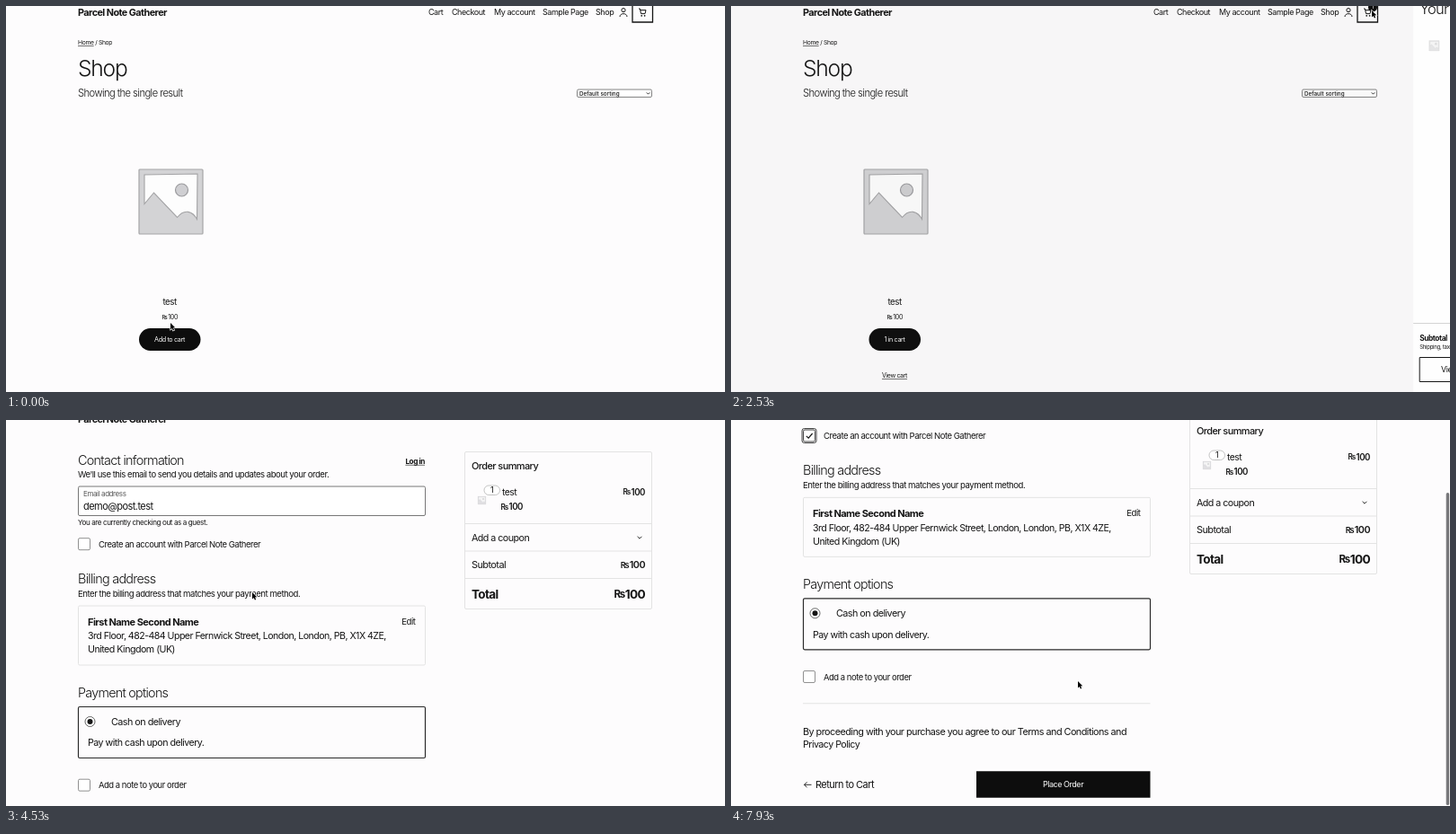
Write an HTML page with a canvas that moves like this. It is 800 by 430 pixels and loops after 8 s.

```html
<!DOCTYPE html>
<html lang="en">
<head>
<meta charset="utf-8">
<title>Guest checkout</title>
<style>
html, body { margin: 0; width: 100%; height: 100%; overflow: hidden; background: #fdfcfd; }
canvas { display: block; width: 800px; height: 430px; }
</style>
</head>
<body>
<canvas id="stage"></canvas>
<script>
const W = 800, H = 430, LOOP = 8000;
const INK = '#151515', PAPER = '#fdfcfd', BLACK = '#0d0d0d', RULE = '#e3e3e3';
const STORE = 'Parcel Note Gatherer';
const canvas = document.getElementById('stage');
const ctx = canvas.getContext('2d');
const ratio = window.devicePixelRatio || 1;
canvas.width = W * ratio;
canvas.height = H * ratio;

// y is the middle of the capitals
function text(str, x, y, size, o = {}) {
  const { weight = size > 11 ? 300 : 400, color = INK, align = 'left', track = -0.05, underline } = o;
  ctx.font = `${weight} ${size}px Inter, sans-serif`;
  ctx.letterSpacing = track * size + 'px';
  ctx.textAlign = align;
  ctx.fillStyle = color;
  const base = y + size * 0.35;
  ctx.fillText(str, x, base);
  if (underline) {
    const w = ctx.measureText(str).width;
    const left = align === 'center' ? x - w / 2 : align === 'right' ? x - w : x;
    ctx.fillRect(left, base + 1, w, 0.6);
  }
}

function price(right, y, size, weight = 400) {
  text('100', right, y, size, { weight, align: 'right' });
  text('Rs', right - size * 1.72, y, size * 0.85, { weight: Math.max(weight, 500), align: 'right', track: -0.13 });
}

function box(x, y, w, h, { r = 0, fill, stroke, line = 1 } = {}) {
  ctx.beginPath();
  ctx.roundRect(x, y, w, h, r);
  if (fill) { ctx.fillStyle = fill; ctx.fill(); }
  if (stroke) { ctx.strokeStyle = stroke; ctx.lineWidth = line; ctx.stroke(); }
}

function path(points, color, line) {
  ctx.beginPath();
  points.forEach(([x, y]) => ctx.lineTo(x, y));
  ctx.strokeStyle = color;
  ctx.lineWidth = line;
  ctx.stroke();
}

function disc(x, y, r, fill, stroke, line = 1) {
  ctx.beginPath();
  ctx.arc(x, y, r, 0, 7);
  if (fill) { ctx.fillStyle = fill; ctx.fill(); }
  if (stroke) { ctx.strokeStyle = stroke; ctx.lineWidth = line; ctx.stroke(); }
}

function shifted(dx, dy, draw) {
  ctx.save();
  ctx.translate(dx, dy);
  draw();
  ctx.restore();
}

const clamp = v => Math.max(0, Math.min(1, v));
const ease = v => v * v * (3 - 2 * v);

// Linear or eased lookup in a list of [time, ...values]
function track(keys, t, curve = v => v) {
  let i = 0;
  while (i < keys.length - 2 && t >= keys[i + 1][0]) i++;
  const [a, b] = [keys[i], keys[i + 1]];
  const k = curve(clamp((t - a[0]) / (b[0] - a[0])));
  return a.slice(1).map((v, j) => v + (b[j + 1] - v) * k);
}

function picture(x, y, size) {
  ctx.save();
  ctx.translate(x, y);
  ctx.scale(size / 72, size / 72);
  box(0.5, 0.5, 71, 72, { r: 1, fill: '#d3d3d5', stroke: '#a6a6a8', line: 1.2 });
  ctx.beginPath();
  ctx.moveTo(6.5, 6.5);
  ctx.lineTo(65.5, 5.5);
  ctx.lineTo(65, 56);
  ctx.bezierCurveTo(60, 47, 51, 44, 43, 54);
  ctx.lineTo(17, 26.5);
  ctx.lineTo(6.5, 39);
  ctx.closePath();
  ctx.fillStyle = '#fdfdfd';
  ctx.fill();
  ctx.strokeStyle = '#a3a3a5';
  ctx.lineWidth = 1.1;
  ctx.stroke();
  disc(48, 23.5, 7, '#cfcfd2', '#9c9c9f', 1.2);
  ctx.restore();
}

function cartIcon(x, y) {
  path([[x - 4, y - 4], [x - 2.6, y - 4], [x - 1.4, y + 1.6], [x + 3, y + 1.6], [x + 4, y - 2.4], [x - 2.2, y - 2.4]], INK, 1);
  disc(x - 0.8, y + 3.8, 0.9, INK);
  disc(x + 2.6, y + 3.8, 0.9, INK);
}

function personIcon(x, y) {
  disc(x, y - 2.4, 2.1, null, INK);
  ctx.beginPath();
  ctx.moveTo(x - 4, y + 5);
  ctx.bezierCurveTo(x - 4, y + 0.5, x + 4, y + 0.5, x + 4, y + 5);
  ctx.stroke();
}

function chevron(x, y, s) {
  path([[x - s, y - s / 2], [x, y + s / 2], [x + s, y - s / 2]], INK, 0.9);
}

function shop(t) {
  const added = t >= 930;
  text(STORE, 80, 7, 10.8, { weight: 700 });
  [['Cart', 470], ['Checkout', 496], ['My account', 543], ['Sample Page', 597], ['Shop', 656]]
    .forEach(([label, x]) => text(label, x, 7, 9));
  personIcon(687, 7);
  box(697, -4, 22.5, 22, { stroke: INK, line: 1.3 });
  cartIcon(708, 7);
  if (t >= 870) {
    disc(714, 1.5, 5, BLACK);
    text('1', 714, 1, 6, { color: '#fff', align: 'center' });
  }

  text('Home', 80, 41, 6.8, { underline: true });
  text('/ Shop', 99.2, 41, 6.8);
  text('Shop', 80, 69, 24.6);
  text('Showing the single result', 80, 97, 11.2);
  box(635.5, 93, 83, 8.5, { r: 1.5, fill: '#fff', stroke: '#777', line: 0.9 });
  text('Default sorting', 638, 97.3, 6.3, { weight: 500, track: 0 });
  chevron(714.5, 97.3, 1.7);

  picture(147.5, 181.5, 72);
  text('test', 182, 330, 9.8, { align: 'center' });
  price(191, 347, 7);
  if (added) box(153.5, 359, 57.5, 25, { r: 12.5, fill: BLACK });
  else box(148, 359, 68.5, 25, { r: 12.5, fill: BLACK });
  ctx.globalAlpha = t > 530 && t < 930 ? 0.6 : 1;
  text(added ? '1 in cart' : 'Add to cart', 182, 371.5, 7.2, { color: '#fff', align: 'center' });
  ctx.globalAlpha = 1;
  if (added) text('View cart', 182, 412, 7, { align: 'center', underline: true });
}

function drawer(t) {
  const open = clamp((t - 2500) / 330);
  if (!open) return;
  ctx.fillStyle = `rgba(60,60,60,${0.33 * open})`;
  ctx.fillRect(0, 0, W, H);
  shifted(228 * (1 - open) ** 2, 0, () => {
    ctx.fillStyle = '#fefefe';
    ctx.fillRect(572, 0, 228, H);
    text('Your cart (1 item)', 579, 3, 16.5);
    path([[785.5, -5], [791.5, 1]], INK, 0.8);
    path([[791.5, -5], [785.5, 1]], INK, 0.8);
    ctx.globalAlpha = 0.6;
    picture(589.5, 38.5, 11.5);
    ctx.globalAlpha = 1;
    text('test', 618, 34, 8.6, { underline: true });
    price(791, 35.5, 8.3);
    price(638, 49.5, 8.3);
    box(618, 60, 50.5, 14.5, { r: 1.5, stroke: '#dcdcdc', line: 0.9 });
    text('−', 625, 67.5, 8, { align: 'center', color: '#555' });
    text('1', 643, 67.5, 8, { align: 'center', weight: 700 });
    text('+', 661.5, 67.5, 8, { align: 'center', color: '#555' });
    text('Remove item', 618, 86.5, 5.8, { underline: true });
    path([[572, 353.5], [800, 353.5]], '#d4d4d4', 1);
    text('Subtotal', 579, 370.5, 8.3, { weight: 700 });
    price(792, 370.5, 8, 700);
    text('Shipping, taxes, and discounts calculated at checkout.', 579, 380, 6.1);
    box(579, 391.5, 97.5, 27, { fill: '#fefefe', stroke: INK });
    text('View my cart', 627.5, 405, 8.9, { align: 'center' });
    box(684, 391, 108, 28, { fill: BLACK });
    text('Go to checkout', 738, 405, 8.9, { align: 'center', color: '#fff', underline: t > 3400 });
  });
}

function statusBar() {
  box(-2, 420, 107, 12, { r: 2, fill: '#4b4b4d' });
  text('parcel-note-gatherer.local/checkout/', 1.5, 425.3, 5.5, { color: '#e8e8e8', track: 0 });
}

function skeleton() {
  text(STORE, 80, -1, 10.8, { weight: 700 });
  [[80, 31.5, 386.5, 105], [80, 152.5, 386.5, 252.5], [80, 420.5, 386.5, 60], [510, 31.5, 209, 460]]
    .forEach(b => box(...b, { r: 1.5, fill: '#d5d5d6' }));
}

function checkbox(y, checked) {
  box(80.5, y, 13, 13, { r: 1.5, fill: '#fff', stroke: checked ? '#333' : '#858585', line: 0.9 });
  if (!checked) return;
  box(79, y - 1.5, 16, 16, { r: 2.5, stroke: '#333', line: 0.9 });
  path([[83.8, y + 6.8], [86.2, y + 9.2], [90.6, y + 4]], INK, 1.2);
}

function form(t) {
  text(STORE, 80, -1, 10.8, { weight: 700 });
  text('Contact information', 80, 44.5, 14.4);
  text('Log in', 466, 46, 8.2, { weight: 700, align: 'right', underline: true });
  text("We'll use this email to send you details and updates about your order.", 80, 61, 9.55);
  box(80.5, 74, 386, 32.5, { r: 1.5, fill: '#fff', stroke: '#777' });
  text('Email address', 86, 82.5, 8, { color: '#555' });
  text('demo@post.test', 86, 96.5, 11, { weight: 400 });
  text('You are currently checking out as a guest.', 80, 114.5, 8.1);
  checkbox(131.7, t >= 6300);
  text('Create an account with ' + STORE, 103, 138.5, 9.5);

  text('Billing address', 80, 177, 14.4);
  text('Enter the billing address that matches your payment method.', 80, 193.5, 9.6);
  box(80.5, 207, 386, 66, { r: 1.5, stroke: RULE });
  text('First Name Second Name', 91, 225, 11, { weight: 700 });
  text('3rd Floor, 482-484 Upper Fernwick Street, London, London, PB, X1X 4ZE,', 91, 240.5, 10.6);
  text('United Kingdom (UK)', 91, 255.5, 10.7);
  text('Edit', 455.5, 224.5, 9.6, { align: 'right' });

  text('Payment options', 80, 304, 14.3);
  box(80.5, 319.5, 386, 57, { r: 1.5, stroke: '#2a2a2a', line: 1.2 });
  disc(93.5, 336, 5.5, '#fff', '#555', 0.9);
  disc(93.5, 336, 3, INK);
  text('Cash on delivery', 117, 336, 10.8);
  text('Pay with cash upon delivery.', 91, 359.5, 10.7);
  checkbox(400.2, false);
  text('Add a note to your order', 103, 407, 9.45);

  path([[80, 436.5], [466.5, 436.5]], RULE, 1);
  text('By proceeding with your purchase you agree to our Terms and Conditions and', 80, 467.5, 10.85);
  text('Privacy Policy', 80, 482, 10.7);
  path([[89.5, 527], [81.5, 527]], INK, 0.9);
  path([[84.5, 524], [81.5, 527], [84.5, 530]], INK, 0.9);
  text('Return to Cart', 94, 527, 11);
  box(273, 512, 193.5, 29.5, { fill: BLACK });
  text('Place Order', 369.5, 526.8, 9, { color: '#fff', align: 'center' });
}

function summary() {
  box(510.5, 35.5, 208, 175, { r: 1.5, stroke: RULE });
  [115.5, 146, 176.5].forEach(y => path([[510.5, y], [718.5, y]], RULE, 1));
  text('Order summary', 518, 51.5, 10.9, { weight: 500 });
  ctx.globalAlpha = 0.7;
  picture(525, 85, 9);
  ctx.globalAlpha = 1;
  box(532, 73, 17.5, 10.5, { r: 5.2, fill: '#fff', stroke: '#bbb', line: 0.9 });
  text('1', 540.7, 78.3, 9, { align: 'center' });
  text('test', 552, 80.5, 10.4);
  price(711, 80.5, 9.7, 600);
  price(575, 97, 9.7, 600);
  text('Add a coupon', 518, 131, 10.7);
  chevron(705, 131, 2.4);
  text('Subtotal', 518, 161.5, 10.9);
  price(711, 161.5, 10.8, 600);
  text('Total', 518, 194, 13.5, { weight: 700 });
  price(711, 194, 13.6, 700);
}

const SCROLL = [[7540, 0], [7600, 9], [7670, 47], [7730, 77], [7800, 101], [7870, 114], [7930, 120.7], [8000, 120.7]];

function checkout(t) {
  const [scroll] = track(SCROLL, t);
  shifted(0, -scroll, () => form(t));
  shifted(0, -Math.min(scroll * 0.79, 39), summary);
  if (scroll) box(795.7, Math.max(2, 24 + (scroll - 47) * 0.775), 3.5, 348, { r: 1.7, fill: '#77777a' });
}

const POINTER = [
  [0, 183, 353], [400, 186, 372], [1550, 186, 374], [1900, 420, 190], [2270, 713, 5], [2560, 713, 5],
  [2930, 698, 391], [3000, 700, 394], [3330, 722, 402], [3620, 722, 402], [4070, 497, 206], [4400, 285, 194],
  [4530, 274, 192], [4820, 274, 192], [5130, 138, 88], [5300, 138, 88], [5930, 95, 123], [6030, 95, 123],
  [6200, 90, 133.5], [6600, 90, 133.5], [6870, 409, 173], [7080, 409, 173], [7330, 386, 291], [8000, 386, 291]
];

function pointer(t) {
  const [x, y] = track(POINTER, t, ease);
  shifted(x, y, () => {
    ctx.beginPath();
    [[0, 0], [0, 7.4], [1.7, 5.9], [2.9, 8.6], [4.2, 8], [3, 5.4], [5.2, 5.2]].forEach(p => ctx.lineTo(...p));
    ctx.closePath();
    ctx.strokeStyle = '#fff';
    ctx.lineWidth = 1.3;
    ctx.stroke();
    ctx.fillStyle = '#000';
    ctx.fill();
  });
}

function render(t) {
  ctx.setTransform(ratio, 0, 0, ratio, 0, 0);
  ctx.globalAlpha = 1;
  ctx.fillStyle = PAPER;
  ctx.fillRect(0, 0, W, H);
  if (t < 3670) {
    shop(t);
    drawer(t);
  } else if (t < 4270) {
    skeleton();
  } else {
    checkout(t);
  }
  if (t >= 3400 && t < 4270) statusBar();
  pointer(t);
}

const start = performance.now();
function tick() {
  render((performance.now() - start) % LOOP);
  requestAnimationFrame(tick);
}
tick();
</script>
</body>
</html>
```
